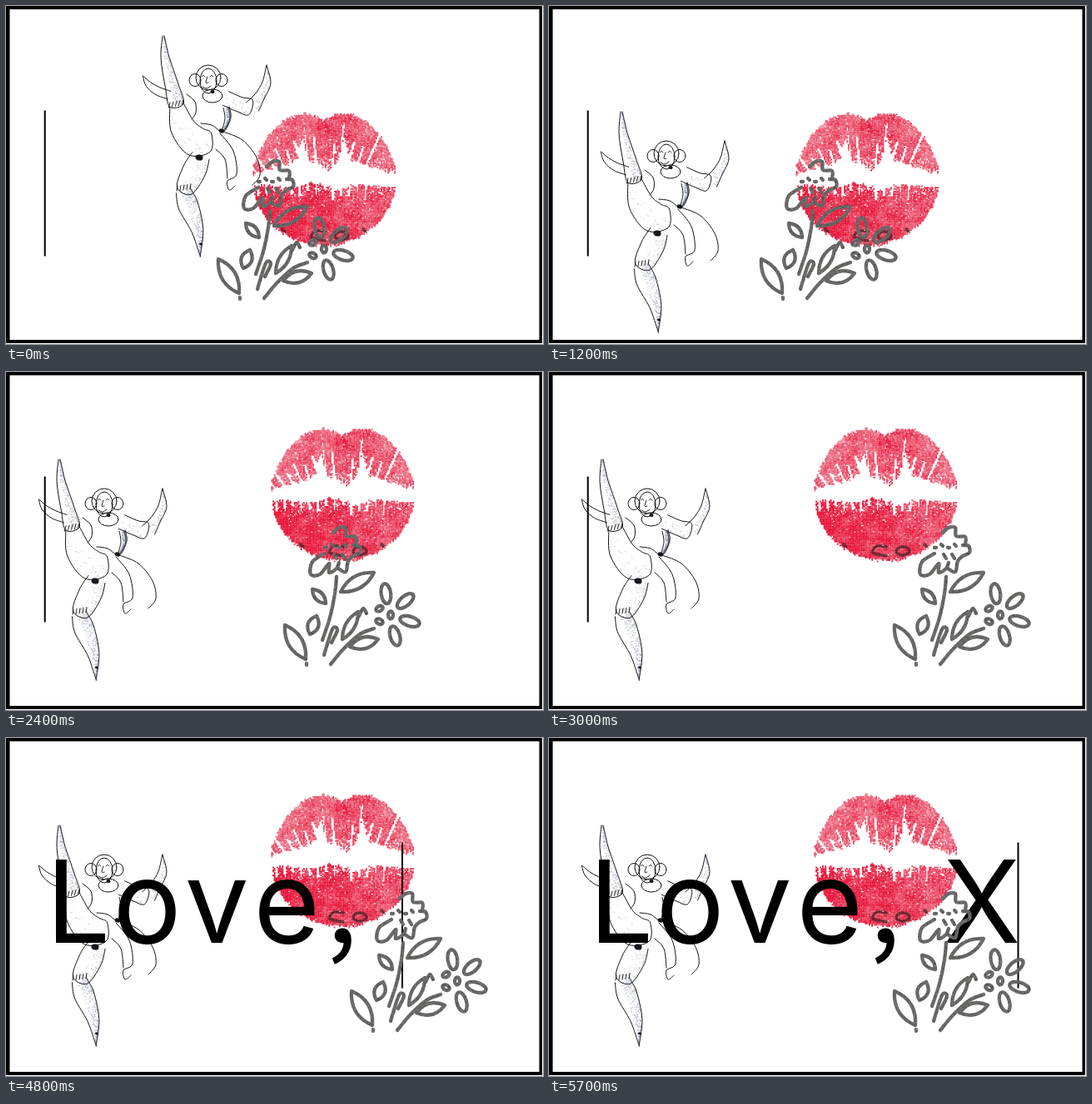
These frames come from a looping animation (645 px wide and 406 px high, 6000 ms). An HTML page with a canvas:

```html
<!DOCTYPE html>
<html lang="en">
<head>
<meta charset="utf-8">
<title>Love, X</title>
<style>
  html, body { margin: 0; width: 100%; height: 100%; overflow: hidden; background: #fff; }
  canvas { display: block; width: 645px; height: 406px; }
</style>
</head>
<body>
<canvas id="stage" width="645" height="406"></canvas>
<script>
const W = 645, H = 406, STEP = 300, LOOP = 6000, TAU = Math.PI * 2;
const stage = document.getElementById('stage').getContext('2d');

let seed = 7;
const rnd = () => (seed = (seed * 16807) % 2147483647) / 2147483647;
const between = (a, b) => a + rnd() * (b - a);
const mix = (a, b, t) => a + (b - a) * t;
const clamp = t => Math.max(0, Math.min(1, t));
const bump = (x, at, width) => Math.exp(-(((x - at) / width) ** 2));

function layer(paint) {
  const c = document.createElement('canvas');
  c.width = W; c.height = H;
  const g = c.getContext('2d');
  g.lineCap = g.lineJoin = 'round';
  paint(g);
  return c;
}

// Smooth line through [x, y] points.
function curve(g, ...p) {
  g.beginPath();
  g.moveTo(...p[0]);
  for (let i = 0; i < p.length - 1; i++) {
    const b = p[i], c = p[i + 1], a = p[i - 1] || b, d = p[i + 2] || c;
    g.bezierCurveTo(b[0] + (c[0] - a[0]) / 6, b[1] + (c[1] - a[1]) / 6,
      c[0] - (d[0] - b[0]) / 6, c[1] - (d[1] - b[1]) / 6, c[0], c[1]);
  }
  g.stroke();
}

function oval(g, x, y, rx, ry, angle = 0) {
  g.beginPath();
  g.ellipse(x, y, rx, ry, angle, 0, TAU);
  g.stroke();
}

function dot(g, x, y, r) {
  g.beginPath();
  g.ellipse(x, y, r * 1.3, r, .2, 0, TAU);
  g.fill();
}

// Outline around joints [x, y, half width], with pencil grain along one side.
function limb(g, grain, side, ...joints) {
  const edge = (i, s) => {
    const a = joints[Math.max(0, i - 1)], b = joints[Math.min(joints.length - 1, i + 1)];
    const [x, y, r] = joints[i], dx = b[0] - a[0], dy = b[1] - a[1], len = Math.hypot(dx, dy);
    return [x - dy / len * r * s, y + dx / len * r * s];
  };
  const sides = [1, -1].map(s => joints.map((_, i) => edge(i, s)));
  curve(g, ...sides[0], ...sides[1].reverse());
  for (let n = 0; n < grain; n++) {
    const t = rnd() * (joints.length - 1), i = Math.floor(t), s = side * (1 - 1.3 * rnd() ** 1.5);
    const a = edge(i, s), b = edge(i + 1, s);
    g.fillStyle = `rgba(85,95,130,${between(.1, .5)})`;
    g.fillRect(mix(a[0], b[0], t - i), mix(a[1], b[1], t - i), 1, 1);
  }
}

function cuff(g, x, y, tilt) {
  for (let i = 0; i < 5; i++) curve(g, [x + i * 4, y + i * tilt], [x + i * 4 + tilt * 2, y + 6 + i * tilt]);
}

const dancer = layer(g => {
  g.strokeStyle = '#111';
  limb(g, 320, -1, [189, 36, 1], [191, 62, 5], [199, 95, 8], [205, 119, 8.5]);
  limb(g, 60, 1, [205, 119, 8.5], [212, 145, 15], [228, 163, 18], [246, 164, 11]);
  limb(g, 130, -1, [234, 180, 11], [226, 198, 14], [214, 222, 9.5]);
  limb(g, 420, -1, [213, 222, 9], [219, 240, 12], [230, 270, 7], [233, 298, .5]);
  limb(g, 50, 1, [264, 111, 9], [280, 118, 9], [294, 122, 9]);
  limb(g, 130, 1, [296, 121, 9], [305, 108, 6], [313, 92, 5], [313, 73, .5]);
  limb(g, 0, 1, [196, 107, 5], [182, 102, 5], [171, 94, 3.5], [165, 85, .5]);
  cuff(g, 197, 116, -.8);
  cuff(g, 206, 216, -.5);

  // torso and sash
  curve(g, [268, 121], [270, 134], [261, 151], [247, 143], [234, 141]);
  limb(g, 220, -1, [264, 122, 3], [266, 135, 3], [261, 149, 1]);
  curve(g, [217, 106], [227, 115], [228, 128], [223, 136]);
  curve(g, [261, 151], [284, 161], [301, 182], [305, 203], [296, 215]);
  curve(g, [257, 153], [273, 174], [277, 202], [266, 210], [268, 221], [275, 216]);
  curve(g, [252, 172], [263, 184], [266, 207]);

  // head
  oval(g, 243, 86, 15, 15);
  oval(g, 243, 90, 10, 15);
  oval(g, 248, 108, 12, 8);
  for (const side of [-1, 1]) {
    oval(g, 243 + side * 16, 89, 7, 7.5);
    curve(g, [242 + side * 5 - 2, 85], [242 + side * 5, 83.5], [242 + side * 5 + 2, 85]);
  }
  curve(g, [242, 85], [240, 92], [243, 92]);
  curve(g, [236, 97], [241, 99], [246, 96]);
  g.fillStyle = '#15151c';
  dot(g, 248, 103, 2);
  dot(g, 259, 150, 2.6);
  dot(g, 232, 182, 3.5);
  dot(g, 234, 286, 1.5);
});

// Lip print: a grain of small cells between four edge functions of u = -1..1.
const lips = layer(g => {
  const CX = 381.5, HALF = 85;
  const edges = u => ({
    top: 128 + 62 * Math.abs(u) ** 3.4 + 8 * bump(u, 0, .13),
    upper: 203 - 19 * (1 - u * u) + 11 * bump(u, .04, .15) - 26 * (bump(u, -.31, .05) + bump(u, .28, .06)),
    lower: 215 + 4 * Math.sin(u * 9) * (1 - u * u),
    bottom: 218 + 69 * (1 - u * u) ** .6
  });
  const hash = i => Math.abs(Math.sin(i * 12.9 + 4) * 43758) % 1;
  const cell = 1.6;
  for (let x = CX - HALF; x < CX + HALF; x += cell) {
    const u = (x - CX) / HALF, e = edges(u);
    for (let y = 126; y < 288; y += cell) {
      const isUpper = y < 208, jitter = between(-2, 2);
      const [from, to] = isUpper ? [e.top, e.upper] : [e.lower, e.bottom];
      if (y + jitter < from || y + jitter > to) continue;

      const depth = isUpper ? e.upper - y : y - e.lower;
      const fan = (x - CX) / (1 + depth * (isUpper ? .008 : -.001)) / 10, crease = Math.round(fan);
      const bare = Math.abs(fan - crease) < .13 && depth < (isUpper ? 45 : 22) * hash(crease);
      if (bare || rnd() < .45 * Math.exp(-depth / 7) + .02) continue;

      const cloud = Math.sin(x * .13 + Math.sin(y * .11) * 2) * Math.sin(y * .16 + x * .05);
      const base = isUpper ? .52 + .2 * bump(x, 390, 22) : .8 - .2 * u;
      const red = clamp(base + cloud * .16 + between(-.28, .28));
      g.fillStyle = `rgb(${mix(243, 232, red)},${mix(185, 18, red)},${mix(195, 54, red)})`;
      g.fillRect(x, y, cell + .3, cell + .3);
    }
  }
  g.globalCompositeOperation = 'source-atop';
  g.strokeStyle = 'rgba(80,28,34,.85)';
  g.lineWidth = 3.5;
  curve(g, [383, 271], [372, 270], [367, 278], [383, 282]);
  oval(g, 403, 276, 8, 5);
  for (const x of [332, 429]) curve(g, [x, 268], [x + 3, 271]);
});

// Almond from base to tip.
function leaf(g, x1, y1, x2, y2, width) {
  const len = Math.hypot(x2 - x1, y2 - y1), nx = (y1 - y2) / len * width, ny = (x2 - x1) / len * width;
  const mx = (x1 + x2) / 2, my = (y1 + y2) / 2;
  g.beginPath();
  g.moveTo(x1, y1);
  g.quadraticCurveTo(mx + nx, my + ny, x2, y2);
  g.quadraticCurveTo(mx - nx, my - ny, x1, y1);
  g.stroke();
}

const flowers = layer(g => {
  g.strokeStyle = '#686866';
  g.lineWidth = 4.3;
  // ragged bloom
  curve(g, [303, 218], [288, 228], [286, 243], [297, 243], [308, 230], [308, 241], [317, 236], [320, 229]);
  curve(g, [319, 236], [328, 240], [331, 227], [337, 221], [345, 217], [344, 209], [337, 208]);
  curve(g, [313, 193], [320, 187], [328, 187], [329, 197], [340, 198], [340, 207]);
  for (let i = 0; i < 4; i++) curve(g, [303 + i * 8, 211 - i % 2 * 4], [305 + i * 8, 211 - i % 2 * 2]);
  for (const x of [314, 324]) curve(g, [x, 219], [x + 3, 224]);

  // stems and leaves
  curve(g, [317, 246], [315, 266], [309, 295], [300, 322]);
  curve(g, [310, 351], [326, 332], [345, 315], [362, 308]);
  curve(g, [302, 340], [312, 309], [318, 310], [311, 325]);
  curve(g, [344, 293], [349, 284], [353, 290]);
  curve(g, [281, 350], [281, 352]);
  leaf(g, 322, 264, 362, 241, 15);
  leaf(g, 288, 261, 304, 278, 10);
  leaf(g, 255, 304, 280, 345, 17);
  leaf(g, 293, 293, 285, 315, 13);
  leaf(g, 324, 321, 343, 288, 11);
  leaf(g, 333, 330, 367, 321, 14);

  // daisy
  for (let k = 0; k < 4; k++) {
    const a = -1.71 + k;
    oval(g, 380 + Math.cos(a) * 26, 292 + Math.sin(a) * 26, 12, 5.8, a);
  }
  for (let k = 0; k < 3; k++) {
    const a = k * TAU / 3;
    oval(g, 373 + Math.cos(a) * 9, 292 + Math.sin(a) * 9, 3, 4.5, a);
  }
  g.globalCompositeOperation = 'source-atop';
  for (let i = 0; i < 5000; i++) {
    g.fillStyle = rnd() < .5 ? 'rgba(45,45,45,.3)' : 'rgba(150,150,150,.25)';
    g.fillRect(between(250, 422), between(180, 356), 1.6, 1.6);
  }
});

// Each hop: first step, last step, x and y travelled.
const hops = {
  dancer: [[0, 4, -102, 91], [4, 5, -23, -22]],
  lips: [[5, 6, 22, -61]],
  flowers: [[6, 10, 160, 0]]
};
const place = (list, step) => list.reduce(([x, y], [from, to, dx, dy]) => {
  const t = clamp((step - from) / (to - from));
  return [x + dx * t, y + dy * t];
}, [0, 0]);

const WORDS = 'Love, X', TYPE_START = 10;
const stops = [46.7, 127, 212, 294.5, 380, 427, 476, 563.5];  // caret rests; letters sit between
const face = ch => ch === ',' ? '500 137px "Noto Sans CJK JP", Lato, sans-serif' : '400 137px Inter, sans-serif';

function draw(step) {
  const g = stage;
  g.fillStyle = '#fff';
  g.fillRect(0, 0, W, H);
  g.fillStyle = '#000';
  g.fillRect(0, 0, 644, 405);
  g.fillStyle = '#fff';
  g.fillRect(4.5, 4, 636, 397);
  g.drawImage(lips, ...place(hops.lips, step));
  g.drawImage(dancer, ...place(hops.dancer, step));

  const count = Math.max(0, Math.min(WORDS.length, step - TYPE_START));
  g.fillStyle = '#000';
  g.textAlign = 'center';
  for (let i = 0; i < count; i++) {
    g.font = face(WORDS[i]);
    g.fillText(WORDS[i], (stops[i] + stops[i + 1]) / 2, 246);
  }
  g.fillRect(stops[count] - 1, 125.5, 2, 175);
  g.drawImage(flowers, ...place(hops.flowers, step));
}

let last = -1;
function tick() {
  const step = Math.floor(performance.now() % LOOP / STEP);
  if (step !== last) draw(last = step);
  requestAnimationFrame(tick);
}
tick();
</script>
</body>
</html>
```
